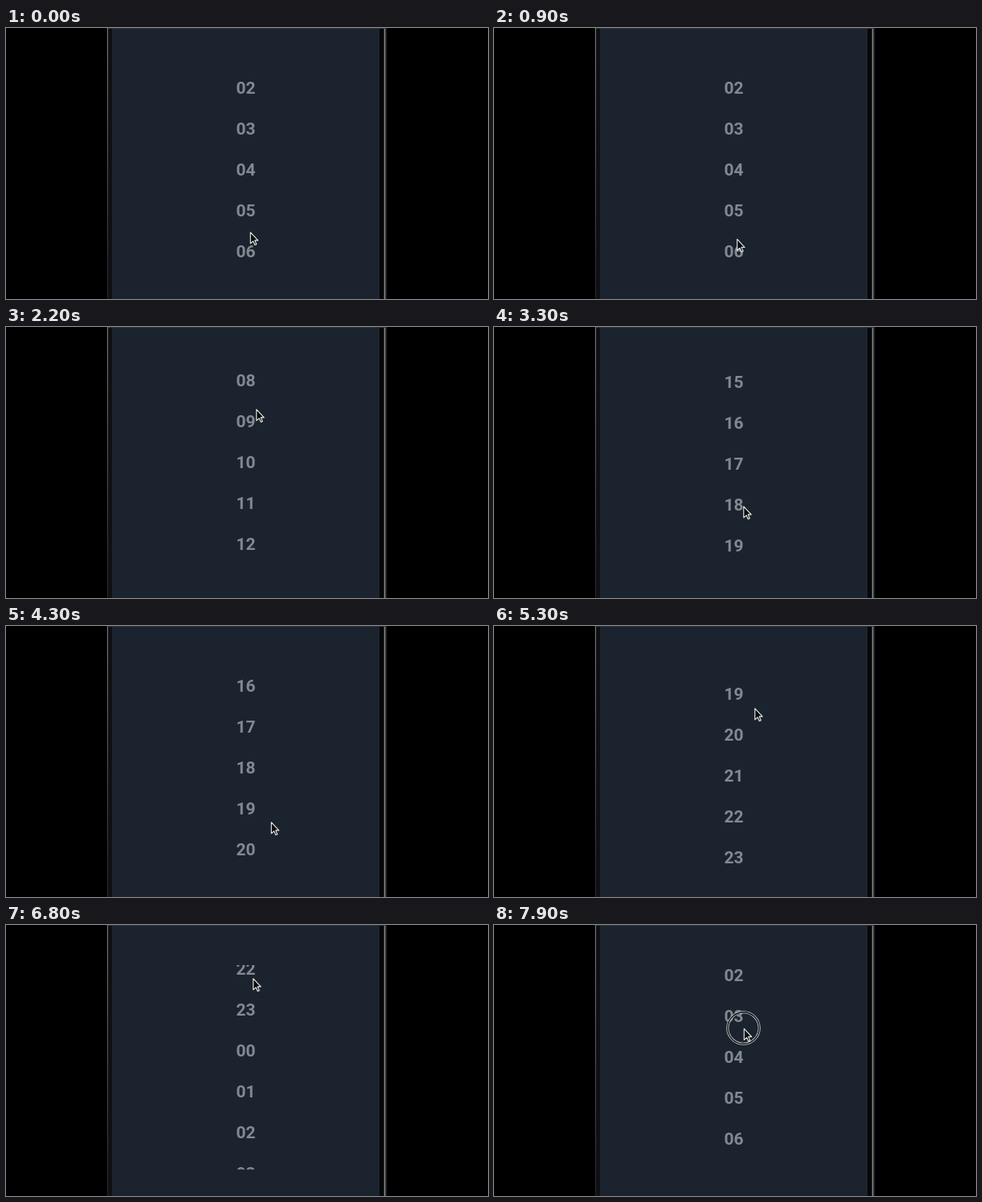
Write an HTML page with a canvas that moves like this. It is 600 px wide and 338 px high and loops after 8 s.

```html
<!DOCTYPE html>
<html lang="en">
<head>
<meta charset="utf-8">
<title>Hour wheel</title>
<style>
  html, body { margin: 0; width: 100%; height: 100%; overflow: hidden; background: #000; }
  canvas { display: block; }
</style>
</head>
<body>
<canvas id="stage" width="600" height="338"></canvas>
<script>
const ctx = document.getElementById('stage').getContext('2d');
const LOOP = 8000, STEP = 100;
const ROW = 51, TOP = 50, VIEW = 255, HOURS = 24;
const BASELINE = 82.3;

// each flick spins the wheel by some rows and dies away with its own friction
const flicks = [
  { at: 1300, rows: 6.51, fade: 193 },
  { at: 2700, rows: 7.49, fade: 163 },
  { at: 4900, rows: 5.7, fade: 242 },
  { at: 6700, rows: 4.535, fade: 143 },
  { at: 7900, rows: 5, fade: 180 }
];

// turning points of the pointer: time, x, y
const turns = [
  [0, 303.5, 254], [100, 301.5, 261], [400, 301.5, 261], [1200, 302, 263],
  [1400, 309, 126], [1600, 309, 126], [2200, 311, 102], [2700, 308, 245],
  [2900, 312, 100], [3300, 310, 223], [4000, 353, 246], [4900, 306, 242],
  [5300, 324, 102], [6600, 306, 245], [6800, 307, 66], [7800, 304, 258],
  [7900, 310.5, 128.5]
];

const easeOut = u => Math.sin(u * Math.PI / 2);
const mix = (a, b, u) => a + (b - a) * u;

function spin(t, fade) {
  const x = Math.max(0, t) / fade;
  const done = 1 - (1 + x) * Math.exp(-x);
  return done > 0.9965 ? 1 : done;
}

function scrollAt(t) {
  return flicks.reduce((sum, f) => sum + f.rows * spin(t - f.at, f.fade), 2);
}

function pointerAt(t) {
  const i = Math.max(1, turns.findIndex(p => p[0] >= t));
  const [t0, x0, y0] = turns[i - 1], [t1, x1, y1] = turns[i];
  const u = easeOut((t - t0) / (t1 - t0));
  return [mix(x0, x1, u), mix(y0, y1, u)];
}

const pressedAt = t => flicks.some(f => t >= f.at - STEP && t < f.at + STEP);

function bar(x, w, fill) {
  ctx.fillStyle = fill;
  ctx.fillRect(x, 0, w, 338);
}

const leftEdge = ctx.createLinearGradient(0, 0, 0, 338);
leftEdge.addColorStop(0, '#808080');
leftEdge.addColorStop(1, '#262628');

function drawPhone() {
  bar(0, 600, '#000');
  bar(126, 1, leftEdge);
  bar(127, 5, '#0f1013');
  bar(132, 333, '#1b242e');
  bar(465, 5, '#060708');
  bar(470, 1, '#343538');
  bar(471, 1, '#8a8b8d');
  bar(472, 2, '#28292b');
  ctx.fillStyle = '#2b333b';
  ctx.fillRect(127, 0, 346, 1);
}

function drawWheel(pos) {
  ctx.save();
  ctx.beginPath();
  ctx.rect(132, TOP, 333, VIEW);
  ctx.clip();
  ctx.font = '700 21px Roboto, sans-serif';
  ctx.textAlign = 'center';
  ctx.fillStyle = '#828a91';
  const first = Math.floor(pos) - 1;
  for (let n = first; n < first + 8; n++) {
    const label = String(n % HOURS).padStart(2, '0');
    ctx.fillText(label, 298.5, BASELINE + (n - pos) * ROW);
  }
  ctx.restore();
}

function ring(x, y, width, color) {
  ctx.beginPath();
  ctx.arc(x, y, 19.7, 0, Math.PI * 2);
  ctx.lineWidth = width;
  ctx.strokeStyle = color;
  ctx.stroke();
}

const arrow = new Path2D('M0 0V14L3.3 11L5.5 15.8L7.5 14.9L5.4 10.1H9.4Z');

function drawPointer(x, y, pressed) {
  if (pressed) {
    ring(x, y, 3, '#d4d6d8');
    ring(x, y, 1.4, '#0a0c0f');
  }
  ctx.save();
  ctx.translate(x + 0.8, y + 0.8);
  ctx.lineJoin = 'round';
  ctx.lineWidth = 1.1;
  ctx.strokeStyle = '#eee';
  ctx.fillStyle = '#080a0c';
  ctx.fill(arrow);
  ctx.stroke(arrow);
  ctx.restore();
}

function draw(now) {
  const t = Math.floor((now % LOOP) / STEP) * STEP;
  drawPhone();
  drawWheel(scrollAt(t));
  drawPointer(...pointerAt(t), pressedAt(t));
}

let begin;
function tick(now) {
  begin ??= now;
  draw(now - begin);
  requestAnimationFrame(tick);
}
draw(0);
requestAnimationFrame(tick);
</script>
</body>
</html>
```
